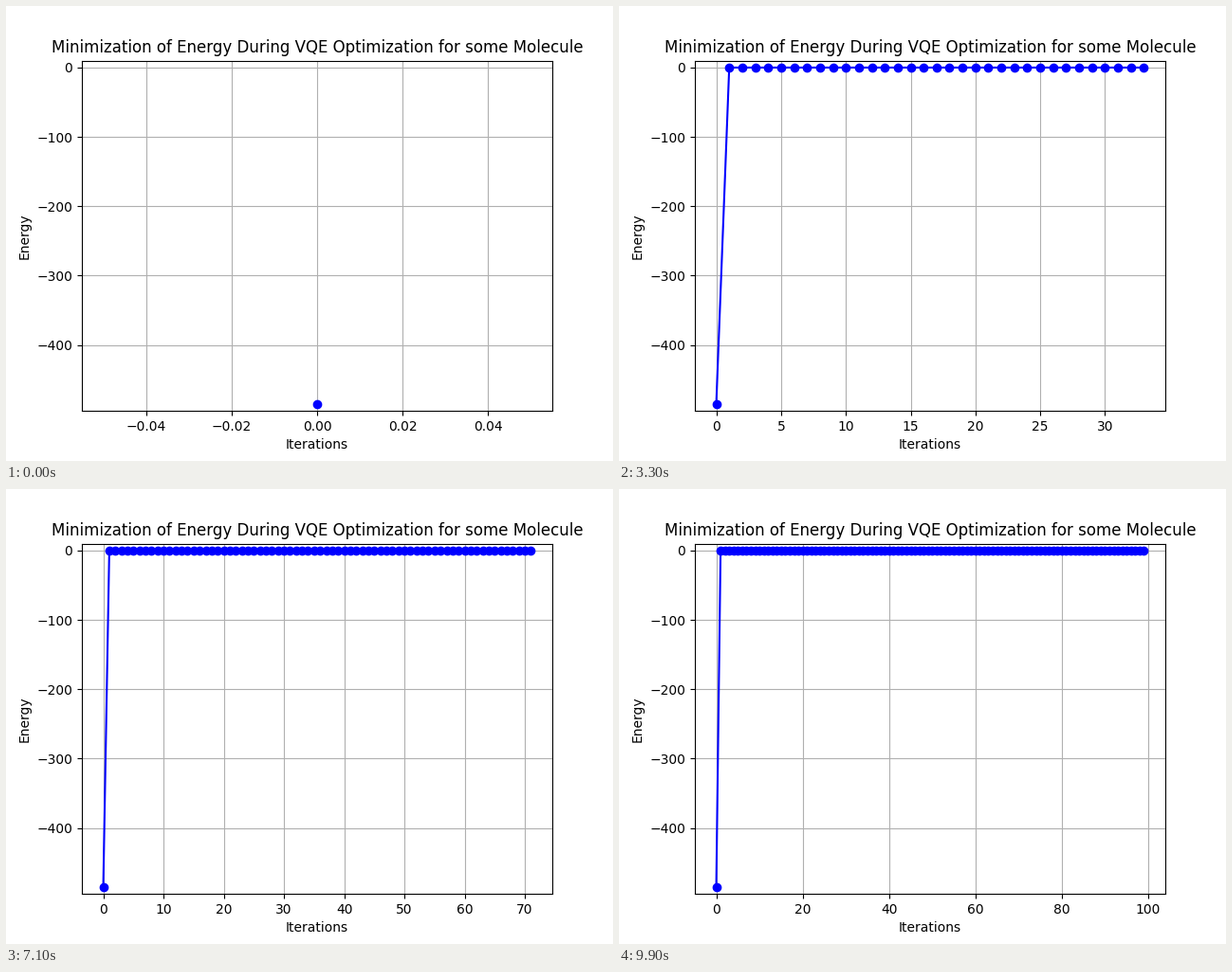
These frames come from a looping animation (640 by 480 pixels, 10000 ms). A matplotlib script:

```python
import numpy as np
import matplotlib.pyplot as plt
from matplotlib.animation import FuncAnimation

STEPS = 100
START_ENERGY = -485.0
PAD = 10

energy = np.zeros(STEPS)
energy[0] = START_ENERGY
iterations = np.arange(STEPS)

fig, ax = plt.subplots(figsize=(6.4, 4.8), dpi=100)


def draw(i):
    ax.clear()
    ax.plot(iterations[:i + 1], energy[:i + 1], "bo-")
    ax.set_ylim(energy.min() - PAD, energy.max() + PAD)
    ax.set_title("Minimization of Energy During VQE Optimization for some Molecule")
    ax.set_xlabel("Iterations")
    ax.set_ylabel("Energy")
    ax.grid(True)


anim = FuncAnimation(fig, draw, frames=STEPS, init_func=lambda: None,
                     interval=100, repeat=True, repeat_delay=0)
plt.show()
```
